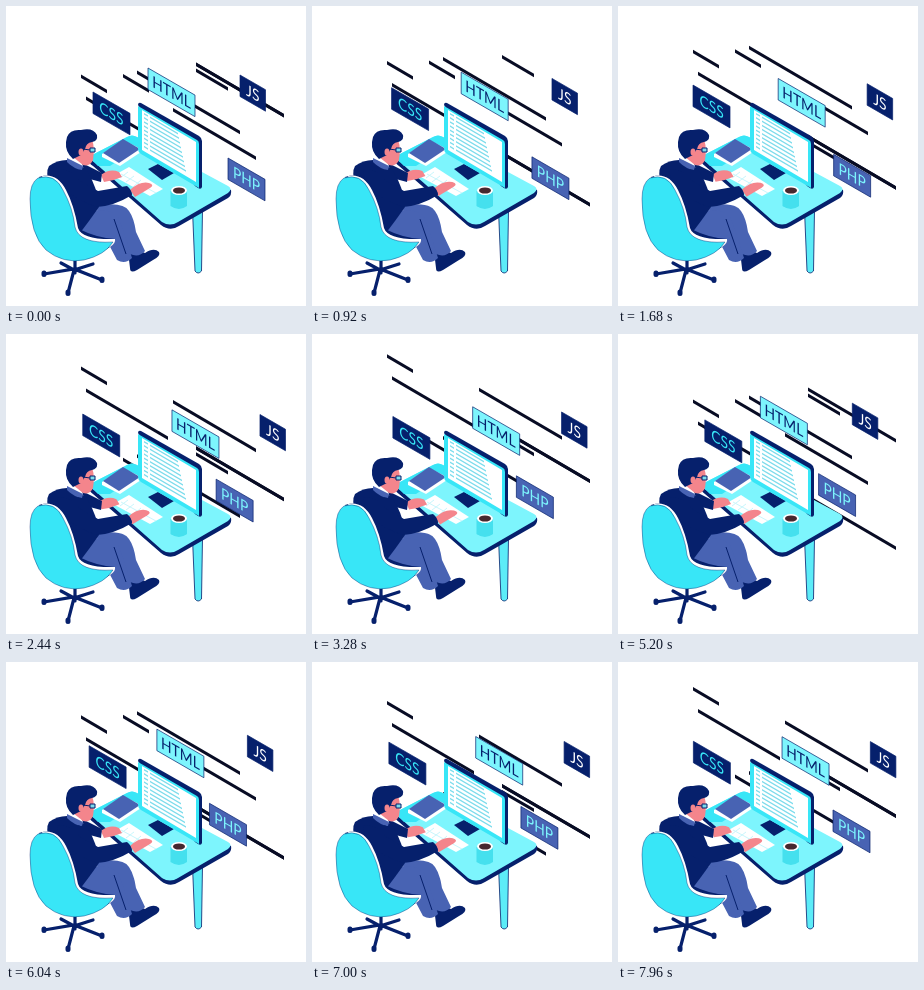
Write an HTML page that moves like this. It is 300 by 300 pixels and loops after 8 s.

```html
<!DOCTYPE html>
<html lang="en">
<head>
<meta charset="utf-8">
<title>Developer at a desk</title>
<style>
  html, body { margin: 0; width: 100%; height: 100%; overflow: hidden; background: #fff; }
  svg { display: block; width: 100vw; height: 100vh; }
  .navy { fill: #06206c; }
  .blue { fill: #4863b3; }
  .cyan { fill: #38e6f7; }
  .skin { fill: #f4858c; }
  .white { fill: #fff; }
  text { font: 16px Lato, sans-serif; text-anchor: middle; }
</style>
</head>
<body>
<svg viewBox="0 0 300 300">
  <g id="bars" fill="#080c24"></g>
  <g id="labels"></g>

  <!-- desk -->
  <path d="M186.5 204H196.5L195.5 265Q192 269 189 265z" fill="#5cecf8" stroke="#06206c" stroke-width=".8"/>
  <path class="navy" d="M83 152Q82 157 87 160L155 219Q164 226 173 220L222 192Q226 189 225 184L126 134z"/>
  <path d="M86 149L121 131Q126 128 131 131L222 180Q227 183 222 187L172 216Q164 221 156 216L88 156Q82 152 86 149z" fill="#7df5fd"/>
  <path class="cyan" d="M86 149L121 131Q126 128 131 131L140 136L104 160H92L88 156Q82 152 86 149z"/>

  <!-- book -->
  <path class="white" d="M96 148L117 134L135 143V146L114 160L96 151z"/>
  <path class="blue" d="M97 147L117 133L134 143L113 157z"/>

  <!-- monitor -->
  <path class="navy" d="M142 163L152 158L168 167L156 174z"/>
  <path class="navy" d="M132 99Q132 96 135 97L193 130Q196 132 196 135V181Q195 184 192 182L189 180z"/>
  <path class="cyan" d="M132 100L191 134Q193 135 193 138V182L135 148Q132 146 132 143z"/>
  <path class="white" d="M136 104L190 136V176L136 144z"/>
  <g id="code" fill="#7cdcec" transform="matrix(1 .585 0 1 138 107)"></g>

  <!-- keyboard and mug -->
  <path class="white" d="M107 170L123 161L157 183L144 190z"/>
  <path d="M114 172L122 166M120 176L128 170M127 181L135 174M134 185L142 179M115 168L150 187" stroke="#c9f6fc" fill="none"/>
  <path d="M164.5 185V200Q173 206 181 200V185z" fill="#45e0ee"/>
  <ellipse class="white" cx="173" cy="184.500" rx="8" ry="4.6"/>
  <ellipse cx="173" cy="184.500" rx="6" ry="3.1" fill="#46282f"/>

  <!-- legs and shoes -->
  <path class="navy" d="M122 245Q133 244 139 247Q148 241 153 246Q155 250 147 254L131 264Q124 268 124 262z"/>
  <path class="blue" d="M88 200Q117 195 123 205Q128 212 130 226L139 245Q133 252 124 248L106 222z"/>
  <path class="blue" d="M66 209Q102 198 112 211Q117 222 126 252Q119 259 111 254L101 235L72 238z"/>
  <path d="M108 213L120 248" stroke="#06206c" fill="none"/>

  <!-- arms and torso -->
  <g class="hand">
    <path class="skin" d="M92 168Q101 161 110 165L113 170Q104 174 95 175z"/>
  </g>
  <path class="navy" d="M76 157L96 167L95 176L80 172z"/>
  <path class="navy" d="M43 160Q52 153 64 154L80 163Q92 182 93 201Q84 214 74 227L66 222L44 178Q39 167 43 160z"/>
  <path class="blue" d="M61 152L77 160L76 164Q68 163 61 156z"/>
  <g class="hand">
    <path class="skin" d="M121 183Q131 174 140 176Q146 178 141 181L126 190z"/>
  </g>
  <path class="navy" d="M51 164Q65 161 73 174L92 185L121 180Q126 184 126 189Q108 200 91 201Q71 195 55 181z"/>

  <!-- head -->
  <path class="skin" d="M67 137L86 133Q89 142 87 154Q84 161 77 159L67 151z"/>
  <path class="navy" d="M61 131Q64 123 75 124Q87 121 91 129Q92 135 86 136Q80 137 79 143L75 149L67 153Q59 146 60 136z"/>
  <ellipse class="skin" cx="75" cy="146" rx="2.500" ry="3.500"/>
  <path d="M77 143L84 144M84 142h5v4h-5z" fill="#7cdcec" stroke="#06206c"/>

  <!-- chair -->
  <g fill="none" stroke="#06206c" stroke-width="3.2" stroke-linecap="round">
    <path d="M69 252V267M38 268L68 263L96 274M68 264L62 287M55 257L68 264L87 258"/>
    <path d="M38 267v1.500M96 273v1.500M62 286v1.500" stroke-width="5"/>
  </g>
  <path class="navy" d="M33 171Q49 166 58 178Q69 193 73 223Q91 232 109 233Q109 239 99 244L70 250z"/>
  <path class="white" d="M36 170Q51 167 60 184Q68 199 72 222Q76 234 109 233Q110 237 104 241L66 242z"/>
  <path class="cyan" d="M32 172Q49 167 57 184Q67 202 69 221Q73 238 107 236Q99 249 78 254Q57 258 40 244Q24 229 24 193Q24 177 32 172z"
        stroke="#06206c" stroke-width=".4"/>
</svg>
<script>
const SLOPE = 0.585, CYCLE = 5000, LOOP = 8000;
const RISE = 0.0147, RETURN = 0.0218; // px per ms before and after the jump
const TYPING = 1500, REACH = 3;

const svgNode = (parent, tag, attrs) => {
  const node = document.createElementNS('http://www.w3.org/2000/svg', tag);
  for (const key in attrs) node.setAttribute(key, attrs[key]);
  return parent.appendChild(node);
};
const byId = id => document.getElementById(id);
const hands = document.querySelectorAll('.hand');

// from x, to x, resting y, time of the jump from top to bottom
const bars = [
  [75, 101, 69, 3420], [80, 162, 91, 4420], [117, 143, 68.5, 1700],
  [131, 234, 65, 1720], [167, 250, 102.5, 3600],
  [190, 278, 57, 100], [190, 278, 57, 480], [190, 222, 63, 980]
].map(([x, end, y, jump]) => ({
  x, y, jump,
  node: svgNode(byId('bars'), 'rect', { width: end - x, height: 3.5 })
}));

const ease = x => (1 - Math.cos(Math.PI * x)) / 2;

// Eases between 0 and 1, turning at each of the given times.
const swing = (times, t) => {
  const i = times.findIndex(time => time > t);
  const progress = ease((t - times[i - 1]) / (times[i] - times[i - 1]));
  return i % 2 ? progress : 1 - progress;
};
const even = [0, 2500, 5000, 7500, 10000];

const labels = [
  { text: 'CSS', x: 87, y: 86, width: 37, fill: '#06206c', ink: '#38e6f7', travel: -12, turns: [0, 1600, 5000, 7700, 10000] },
  { text: 'HTML', x: 142, y: 62, width: 47, fill: '#7df5fd', ink: '#06206c', travel: 24, turns: even },
  { text: 'JS', x: 234, y: 69, width: 25.5, fill: '#06206c', ink: '#fff', travel: 20, turns: even },
  { text: 'PHP', x: 222, y: 152, width: 37, fill: '#4863b3', ink: '#7df5fd', travel: -22, turns: [0, 4650, 10000] }
];
for (const label of labels) {
  label.node = svgNode(byId('labels'), 'g', {});
  svgNode(label.node, 'path', {
    d: `M0 0L${label.width} ${label.width * 0.577}v21.5L0 21.5z`,
    fill: label.fill, stroke: '#06206c', 'stroke-width': 0.7
  });
  svgNode(label.node, 'text', {
    transform: `translate(${label.width / 2} ${label.width * 0.2885}) matrix(.866 .5 0 1 0 0)`,
    y: 16.5, fill: label.ink
  }).textContent = label.text;
}

// rows of text on the screen
for (let row = 0; row < 9; row++) {
  const y = row * 4.1;
  svgNode(byId('code'), 'rect', { x: 0, y, width: 4, height: 1.5 });
  svgNode(byId('code'), 'rect', { x: 6, y, width: 28 + (row * 17) % 16, height: 1.5 });
}

function draw(now) {
  const t = now % LOOP, phase = t % CYCLE;
  for (const { node, x, y, jump } of bars) {
    const offset = phase < jump ? -RISE * phase : RETURN * (CYCLE - phase);
    node.setAttribute('transform', `matrix(1 ${SLOPE} 0 1 ${x} ${y + offset - 0.5})`);
  }
  for (const { node, x, y, travel, turns } of labels) {
    const shift = travel * swing(turns, t);
    node.setAttribute('transform', `translate(${x + shift} ${y + shift * 0.577})`);
  }
  const reach = REACH * (1 - ease(2 * t / TYPING));
  for (const hand of hands) hand.setAttribute('transform', `translate(${reach} ${reach * 0.3})`);
  requestAnimationFrame(draw);
}
draw(performance.now());
</script>
</body>
</html>
```
